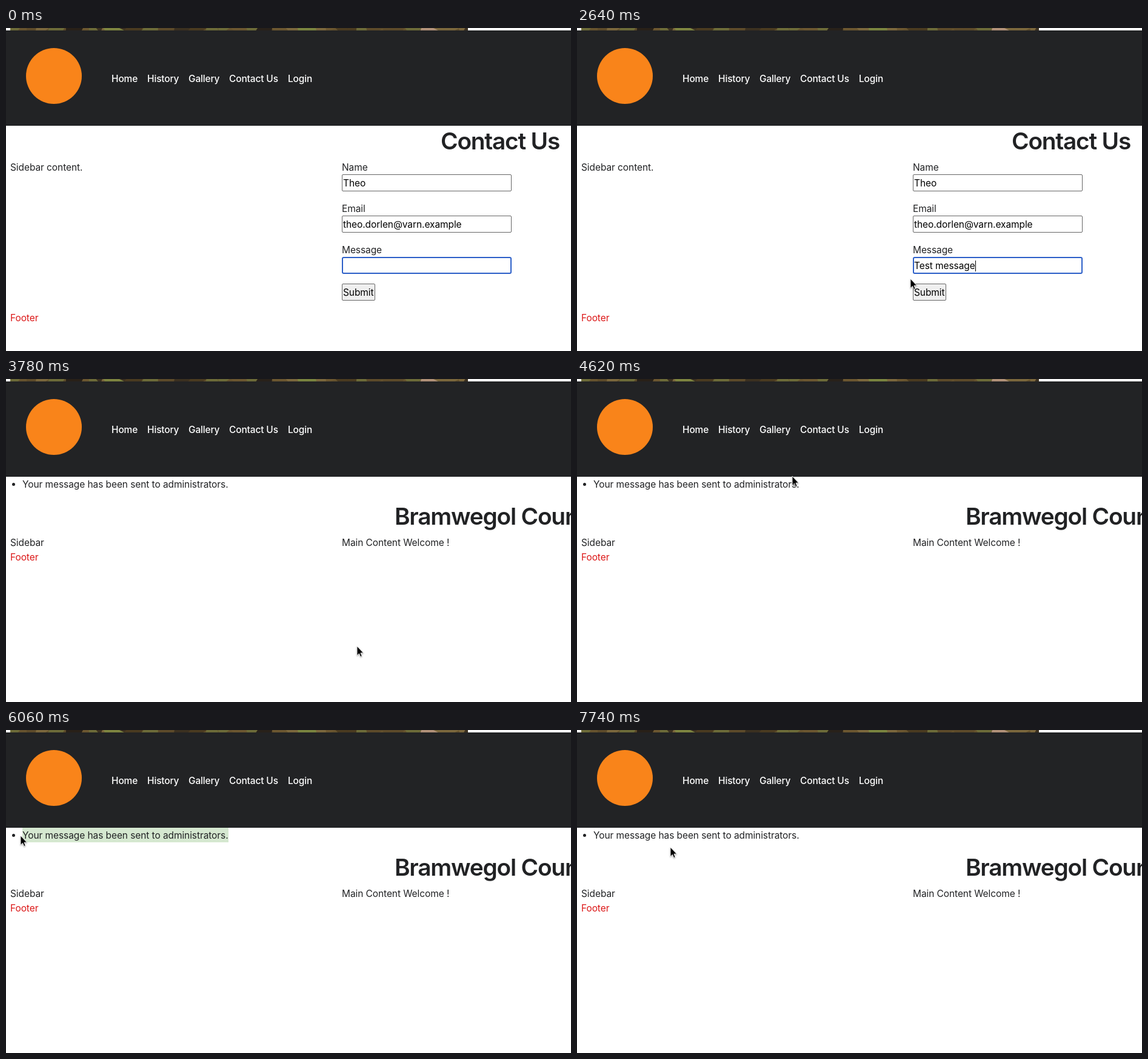
Animation of 932x532 px, one loop 8 s. Source, as an HTML page:

```html
<!DOCTYPE html>
<html lang="en">
<head>
<meta charset="utf-8">
<title>Contact form</title>
<style>
html, body { margin: 0; width: 100%; height: 100%; overflow: hidden; background: #fff; }
body { position: relative; font: 15.5px/24px Inter, Roboto, sans-serif; letter-spacing: -.0055em; color: #212224; }
#stage { position: absolute; left: 0; top: 0; width: 932px; height: 532px; overflow: hidden; }
#stage * { box-sizing: border-box; }
.at, nav, nav span, .field, .button, #stage > svg { position: absolute; white-space: pre; }
div.at { padding-top: 1px; }
#camo { left: 7px; top: 0; }
nav { left: 0; top: 4px; width: 932px; height: 157px; background: #222325; }
nav span { top: 68px; color: #fff; font-weight: 500; letter-spacing: -.01em; }
nav i { position: absolute; left: 33px; top: 29px; width: 92px; height: 92px; border-radius: 50%; background: #f9841a; }
h1 { margin: 0; font-size: 38.8px; line-height: 48px; font-weight: 560; letter-spacing: -1.2px; }
.red { color: #dc1717; }
.field, .button { left: 554px; height: 28px; padding: 1px 0 0 1px; border: 1px solid #666; border-radius: 2px; line-height: 26px; color: #000; }
.field { width: 280px; background: #fff; }
.field.focus { border: 2px solid #2c5fc8; border-radius: 3px; padding-left: 0; line-height: 24px; }
.button { top: 421px; width: 55px; background: #efefef; }
.button.hover { background: #dededf; border-color: #4a4a4a; }
.button.down { background: #f5f5f5; border-color: #8d8d8d; }
#caret { display: inline-block; width: 1px; height: 18px; margin-right: -1px; vertical-align: -4px; background: #000; }
#picked { display: inline-block; height: 24px; margin-top: -1px; padding-top: 1px; vertical-align: top; background: #d5e8d0; }
#dot { left: 10px; top: 171px; width: 5px; height: 5px; border-radius: 50%; background: #212224; }
#mouse { left: 0; top: 0; overflow: visible; filter: drop-shadow(0 1px 1px rgba(0,0,0,.35)); }
</style>
</head>
<body>
<div id="stage">
  <svg id="camo" width="755" height="4"></svg>
  <nav><i></i></nav>

  <div id="form">
    <h1 class="at" style="left:717px;top:162px">Contact Us</h1>
    <div class="at" style="left:7px;top:217px">Sidebar content.</div>
    <div class="at" style="left:554px;top:217px">Name</div>
    <div class="field" style="top:241px">Theo</div>
    <div class="at" style="left:554px;top:285px">Email</div>
    <div class="field" style="top:309px">theo.dorlen@varn.example</div>
    <div class="at" style="left:554px;top:353px">Message</div>
    <div class="field focus" style="top:377px"><span id="typed"></span><span id="caret"></span></div>
    <div class="button" id="submit">Submit</div>
    <div class="at red" style="left:7px;top:465px">Footer</div>
  </div>

  <div id="home">
    <div class="at" id="dot"></div>
    <div class="at" style="left:27px;top:161px"><span id="plain"></span><span id="picked"></span></div>
    <h1 class="at" style="left:641px;top:202px">Bramwegol Country</h1>
    <div class="at" style="left:7px;top:257px">Sidebar</div>
    <div class="at" style="left:554px;top:257px">Main Content Welcome !</div>
    <div class="at red" style="left:7px;top:281px">Footer</div>
  </div>

  <svg id="mouse" width="1" height="1">
    <path id="arrow" d="M0 0V15.5L3.5 12.2L5.8 17.6L8.2 16.5L6 11.2H10.6Z" fill="#000" stroke="#fff" stroke-width=".9"/>
    <g id="beam" fill="none">
      <path d="M-3.5 -7.5Q0 -7.5 0 -5V5Q0 7.5 -3.5 7.5M3.5 -7.5Q0 -7.5 0 -5V5Q0 7.5 3.5 7.5M-2 2.5H2" stroke="#fff" stroke-width="2.4"/>
      <path d="M-3.5 -7.5Q0 -7.5 0 -5V5Q0 7.5 -3.5 7.5M3.5 -7.5Q0 -7.5 0 -5V5Q0 7.5 3.5 7.5M-2 2.5H2" stroke="#000"/>
    </g>
    <g id="hand" stroke="#000" stroke-linejoin="round" stroke-linecap="round">
      <path d="M-.5 10.5V1.5Q-.5 0 1 0T2.5 1.5V6.5Q3.2 5.4 5 6.6Q6.3 5.8 7.4 7.2Q9.8 6.8 9.8 9.4Q9.8 13 8.2 15V17.5H1.2V15.6Q-1.4 13 -3.6 10Q-4.4 8.2 -2.7 8Q-1.6 8.2 -.5 10.5Z" fill="#fff"/>
      <path d="M2.6 11.5V14.5M4.7 11.5V14.5M6.8 11.5V14.5" fill="none" stroke-width=".8"/>
    </g>
  </svg>
</div>

<script>
const LOOP = 8000, STEP = 60;
const $ = id => document.getElementById(id);
const show = (el, on) => { el.style.visibility = on ? "visible" : "hidden"; };

const MESSAGE = "Test message";
const NOTICE = "Your message has been sent to administrators.";
const KEY_TIMES = [300, 420, 540, 660, 900, 960, 1080, 1140, 1320, 1440, 1560, 1680];
const SENT = 3660;

// time, x, y, pointer shape from that time on
const MOVES = [
  [2160, 500, 345, "arrow"],
  [2700, 552, 415, "arrow"],
  [2880, 574, 436, "hand"],
  [3000, 579, 440, "hand"],
  [3780, 579, 440, "arrow"],
  [4380, 579, 440, "arrow"],
  [4620, 355, 160, "arrow"],
  [4740, 364, 172, "beam"],
  [4860, 368, 174, "beam"],
  [5280, 181, 175, "beam"],
  [5820, 30, 174, "beam"],
  [5940, 24, 174, "arrow"],
  [6060, 24, 174, "arrow"],
  [6240, 42, 190, "arrow"],
  [6420, 66, 178, "beam"],
  [6600, 74, 172, "beam"],
  [7080, 74, 172, "beam"],
  [7140, 154, 193, "arrow"]
];
// time, first selected character
const PICKS = [[4860, 45], [5280, 20], [5880, 0], [6420, 0]];

// Segment of a step table at time t, with eased progress
function segment(table, t) {
  let i = 0;
  while (i < table.length - 1 && t >= table[i + 1][0]) i++;
  const a = table[i], b = table[i + 1] || a;
  const p = a === b ? 0 : Math.max(0, (t - a[0]) / (b[0] - a[0]));
  return { a, b, p: p * p * (3 - 2 * p) };
}
const mix = (a, b, p) => a + (b - a) * p;

function drawMouse(t) {
  const { a, b, p } = segment(MOVES, t);
  const x = Math.round(mix(a[1], b[1], p)), y = Math.round(mix(a[2], b[2], p));
  $("mouse").style.transform = `translate(${x}px, ${y}px)`;
  for (const kind of ["arrow", "beam", "hand"]) show($(kind), t >= MOVES[0][0] && kind === a[3]);
}

function drawForm(t) {
  const count = KEY_TIMES.filter(k => k <= t).length;
  $("typed").textContent = MESSAGE.slice(0, count);
  const last = KEY_TIMES[KEY_TIMES.length - 1];
  const lit = t < last ? t >= 120 : Math.floor((t - last) / 480) % 2 === 0;
  show($("caret"), lit && t < 3120);
  $("submit").className = "button" + (t >= 3480 ? " down" : t >= 2880 ? " hover" : "");
}

function drawNotice(t) {
  const { a, b, p } = segment(PICKS, t);
  const on = t >= PICKS[0][0] && t < PICKS[PICKS.length - 1][0];
  const from = on ? Math.round(mix(a[1], b[1], p)) : NOTICE.length;
  $("plain").textContent = NOTICE.slice(0, from);
  $("picked").textContent = NOTICE.slice(from);
}

function draw(t) {
  const sent = t >= SENT;
  $("form").style.display = sent ? "none" : "block";
  $("home").style.display = sent ? "block" : "none";
  if (sent) drawNotice(t); else drawForm(t);
  drawMouse(t);
}

function buildNav() {
  const items = { Home: 174, History: 233, Gallery: 301, "Contact Us": 368, Login: 465 };
  for (const [label, x] of Object.entries(items)) {
    const el = document.createElement("span");
    el.textContent = label;
    el.style.left = x + "px";
    document.querySelector("nav").append(el);
  }
}

function buildCamo() {
  const tones = ["#6b5630", "#4a3a20", "#6c6a38", "#5c4a2a", "#7a663c", "#3b3020"];
  let seed = 11;
  const rand = () => (seed = seed * 16807 % 2147483647) / 2147483647;
  const patch = (x, w, fill) =>
    `<path d="M${x} 0H${x + w}l${rand() * 16 - 8} 4H${x - 4 + rand() * 8}Z" fill="${fill}"/>`;
  let out = '<path d="M0 0H755V4H0Z" fill="#65522e"/>';
  for (let x = 0; x < 755; x += 10 + rand() * 20)
    out += patch(x, 16 + rand() * 24, tones[Math.floor(rand() * tones.length)]);
  out += patch(92, 28, "#282018") + patch(154, 26, "#7d8440") + patch(408, 24, "#28211a")
    + patch(474, 30, "#79833f") + patch(678, 20, "#b09078");
  $("camo").innerHTML = out;
}

buildNav();
buildCamo();
const start = performance.now();
function tick(now) {
  const t = Math.max(0, now - start) % LOOP;
  draw(Math.floor(t / STEP) * STEP);
  requestAnimationFrame(tick);
}
draw(0);
requestAnimationFrame(tick);
</script>
</body>
</html>
```
